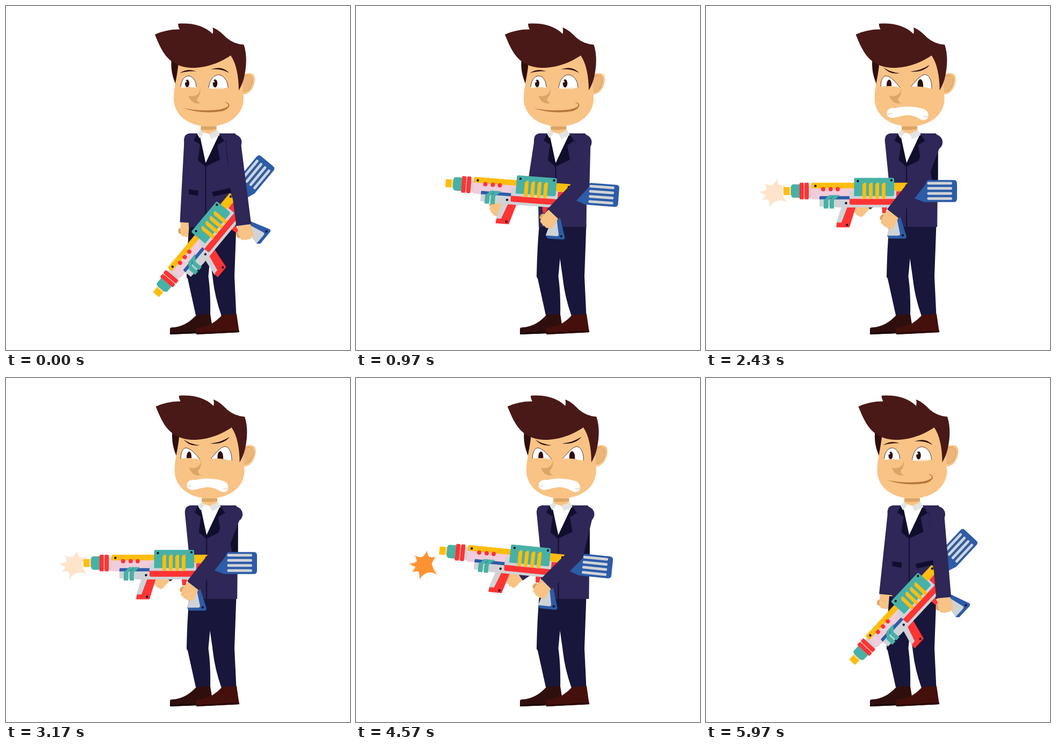
An HTML page for the animation above (6010 ms loop, 640 by 640 pixels).

```html
<!DOCTYPE html>
<html lang="en">
<head>
<meta charset="utf-8">
<title>Toy blaster</title>
<style>
html, body { margin: 0; width: 100%; height: 100%; overflow: hidden; background: #fff; }
svg { display: block; width: 100vw; height: 100vh; }
.skin { fill: #f8c385; }
.shade { fill: #dba566; }
.navy { fill: #2e2757; }
.dark { fill: #100e2d; }
.brown { fill: #2f0f0d; }
.hair { fill: #481917; }
.white { fill: #fff; }
.yellow { fill: #ffbd10; }
.teal { fill: #47b1a6; }
.red { fill: #ff3434; }
.pink { fill: #f1ccdb; }
.gray { fill: #d0d3d6; }
.blue { fill: #2d5ca8; }
.sleeve { fill: none; stroke: #2e2757; stroke-linejoin: round; }
.dots { fill: none; stroke-linecap: round; }
</style>
</head>
<body>
<svg viewBox="0 0 640 640">
  <defs>
    <g id="hand">
      <ellipse class="shade" cx="-12" cy="17" rx="4" ry="6"/>
      <path class="skin" d="M-12-2H12L16 18Q17 25 11 25Q9 29 4 27Q1 30-3 27Q-8 29-10 23L-12 14Z"/>
    </g>
  </defs>

  <g id="farHand"><use href="#hand" transform="scale(.95)"/></g>
  <path id="farArm" class="sleeve" stroke-width="26"/>

  <g id="legs">
    <path fill="#18163a" d="M341 406H428.500L425 503L428.500 576L401 577Q388 540 384.500 505L379.500 470L376.500 503Q381 535 380 575L353 575L338 507L336 504Q337 450 341 406Z"/>
    <path class="brown" d="M354 575L380 573L383 592L380 608L305 611V601Q305 598 309 598Q334 597 354 575Z"/>
    <path fill="#190504" d="M305 608L380 604V608L305 611Z"/>
    <path fill="#45100b" d="M402 575L429 573L434 607L354 611V601Q355 598 358 598Q382 597 402 575Z"/>
    <path fill="#290605" d="M354 608L434 603.500V607L354 611Z"/>
  </g>

  <g id="body">
    <path class="navy" d="M341 237H426Q431 240 430 275L428.500 411H340L338 320L331 249Q332 238 341 237Z"/>
    <path class="dark" d="M408 250L430 258V330H420L411 280Z"/>
    <path class="dark" d="M340 341L358 343.500L357 353L340 350ZM383 346L417 338.500L419 347L386 354.500Z"/>
    <path class="dark" d="M356 237L349 250L361 258L357 287L371 299L398 286L393 259L406 251L397 238Z"/>
    <path class="dark" d="M370.700 296H372.500V411H370.700Z"/>
    <path class="white" d="M361 243L364 234H391L396 240L371.500 292Z"/>
    <path class="skin" d="M362.500 218H391.500V234L377 238L362.500 233Z"/>
    <path class="shade" d="M362.500 224H391.500V229Q377 232 362.500 230Z"/>
    <path fill="#e3e3e1" d="M362 230.500L368.500 236L360 246L355.500 238ZM377 238L393 230.500L398 240L382 248Z"/>

    <path class="skin" d="M440 128C452 122 463 124 463 136C462 153 452 166 440 164Z"/>
    <path fill="#ebb57b" stroke="#dba566" stroke-width="1.300" d="M440 132C452 125 460 130 458.500 142C455 156 447 161 439 159"/>
    <path class="brown" d="M308 98L322 108L317 149C309 131 306 115 308 98Z"/>
    <path class="skin" d="M321 104C319 132 312 150 312 172C312 203 340 224 377 224C414 224 442 203 442 172L438 85Z"/>
    <path class="hair" d="M277 53Q299 43 323 43.500Q320 38 320 33C345 31 368 36 384.500 52Q386 46 384.500 40C395 44 402 51 410 59Q424 71 442.500 72C449 92 447 113 444 128Q441 144 433 157C433 130 428 106 418 92C398 106 370 116 344 115C303 112 291 88 277 53Z"/>
    <path class="shade" d="M361.500 152C361 163 354 170 339 167C344 178 350 183 362 180.500Q354 178 356 172Q363 165 361.500 152Z"/>

    <g id="calm">
      <path class="brown" d="M323 125Q337 115 354 121.500Q338 120.500 323 125ZM381 118Q402 110 415 124.500Q400 116 381 118Z"/>
      <g class="white" stroke="#2f0f0d" stroke-width=".8">
        <path d="M325 151C326 137 333 130 340 130C349 131 354 141 354 151"/>
        <path d="M377 153C379 136 387 128 396 128C407 129 413 142 413 152"/>
      </g>
      <path class="white" d="M325 150Q340 154 354 150.500V152H325ZM377 152Q395 156 413 151Q400 157 377 153Z"/>
      <g class="brown">
        <ellipse cx="337" cy="144" rx="4" ry="7"/>
        <ellipse cx="389" cy="144" rx="4.300" ry="7.500"/>
      </g>
      <path class="dots" stroke="#fff" stroke-width="4" d="M334 140.500h0M386 140.500h0"/>
      <path fill="#b5783a" d="M330 190Q366 197 398 192.500C413 189 420 184 406 178.500C421 180 417 191 403 195.500Q366 202 330 190Z"/>
    </g>

    <g id="angry" transform="translate(-1.500)">
      <path class="brown" d="M330 114Q341 123 360 125Q341 128 330 114ZM380 122Q400 120 416 109.500Q405 124 380 122Z"/>
      <g class="white" stroke="#2f0f0d" stroke-width=".8">
        <path d="M325 150C325 138 329 130 335 130C343 131 352 140 361 152"/>
        <path d="M381 150C390 140 398 129 407 127.500C416 128 420 140 420 154"/>
      </g>
      <path class="brown" d="M336 149C335 134 346 132 345 149ZM393.500 150C392 132 405 131 404 151Z"/>
      <path class="skin" d="M324 150.500Q342 147 362 152V155H324ZM380 150Q402 148.500 421 154.500V157H380Z"/>
      <path class="white" d="M336 200C337 192 343 188 352 190C372 184 396 188 408 193C415 198 416 210 407 212C398 214 395 204 375 203C358 204 350 211 341 207Q336 205 336 200Z"/>
      <path fill="none" stroke="#b99" stroke-width=".7" d="M336 200Q340 203 345 200M404 205Q409 208 413 205"/>
    </g>
  </g>

  <path id="flash" fill="#ff9333" d="M98 345Q108 346 113 341Q113 336 109 330Q117 334 123 333Q129 329 132 321Q133 330 137 333Q143 335 149 332Q143 339 141 346Q145 360 152 366Q142 361 135 362Q124 364 118 375Q119 364 116 360Q110 359 104 361Q110 355 110 351Q104 349 98 345Z"/>

  <g id="gun">
    <path class="blue" d="M376 344L408 330Q410 324 415 324H461Q467 324 467 330V359Q467 365 461 365H406L376 354Z"/>
    <path class="dots" stroke="#d0d3d6" stroke-width="5" d="M414 330H455.500M414 339.500H455.500M414 349H455.500M414 358.500H455.500"/>
    <path class="blue" d="M350 380L361 391L373 429Q373 433 369 433H341L337 428Z"/>
    <path class="gray" d="M347 384L355 395L361 424Q361 427 358 427.500H337L344 404Z"/>
    <path class="red" d="M327 373H338L334 386H328Z"/>
    <path class="gray" d="M252 374H268L256 405H242Z"/>
    <path class="red" d="M263 374H278.500L267 412H243Q241 411 244 403H252Z"/>
    <rect class="yellow" x="144" y="337" width="13" height="15" rx="2"/>
    <rect fill="#f7d98b" x="155" y="337" width="5" height="15"/>
    <rect class="gray" x="170" y="334" width="26" height="22"/>
    <path class="teal" d="M162 332H174V357H162Q158 355 158 350V338Q158 333 162 332Z"/>
    <path class="pink" d="M191 338H300V360H198L191 355Z"/>
    <path class="gray" d="M190 337H196V357H190Z"/>
    <g class="red">
      <rect x="174" y="329" width="8" height="31" rx="2"/>
      <rect x="183.300" y="329" width="8" height="31" rx="2"/>
    </g>
    <path class="yellow" d="M198 329H376Q379 330 376 334L368 347H350L346 339.500H196V331Z"/>
    <path class="dots" stroke="#ff3434" stroke-width="8" d="M218 341h0M232 341h0M245 341h0"/>
    <rect class="blue" x="211" y="354" width="75" height="10" rx="2"/>
    <path class="gray" d="M211 360H352V375H245L211 373Z"/>
    <path class="gray" d="M269 344H358V360H267V347Z"/>
    <path class="red" d="M267 359H354V345H369L376 352V370H270Q267 370 267 367Z"/>
    <path class="teal" d="M219 377V362L229 352H239L227.500 362V377ZM230 377V362L239 352H249L238 362V377Z"/>
    <path class="teal" d="M278 320H347Q350 320 350 323V350Q350 354 346 354H275.500V323Q275.500 320 278 320Z"/>
    <path class="gray" d="M288 354H335V359H288Z"/>
    <path class="yellow" d="M291 360V333L294 329H298V358ZM303 360V333L306 329H310V358ZM315 360V333L318 329H322V358ZM327 360V333L330 329H334V358Z"/>
    <path class="dots" stroke="#10142f" stroke-width="4.400" d="M203.500 335h0M373 334.500h0M282.500 326h0M345 324.500h0M260.500 367h0M262.500 407.500h0M366 427h0"/>
  </g>

  <g id="nearHand"><use href="#hand"/></g>
  <path id="nearArm" class="sleeve" stroke-width="28"/>
  <circle id="shoulder" class="navy" cy="253.500" r="14.500"/>
</svg>
<script>
const LOOP = 6010, STEP = 40, LAST = 149;
const FIRE = 60, LAST_SHOT = 108, CALM = 117;
const PIVOT = [340, 392];

// step, grip x, grip y, gun angle, far wrist x, far wrist y
const keys = [
  [0, 441, 416.8, -50.2, 336.5, 403],
  [16, 398.7, 424, -31.7, 318, 398],
  [24, 358.5, 391.5, 4.3, 273, 368],
  [32, 332, 388, 21, 280, 362],
  [45, 336.5, 392, -1.2, 296, 368],
  [108, 336.5, 392, -1.2, 296, 368],
  [114, 335, 388.5, 2.1, 298, 366],
  [124, 366.6, 421, -30.3, 305, 392],
  [140, 405.4, 415, -46.8, 322, 402],
  [149, 426.3, 419.3, -51.8, 328.5, 403]
];

const $ = id => document.getElementById(id);
const ease = x => (1 - Math.cos(Math.PI * x)) / 2;

const slope = (i, c) => (keys[i + 1][c] - keys[i][c]) / (keys[i + 1][0] - keys[i][0]);

// Tangent that never overshoots a key
function tangent(i, c) {
  if (i === 0 || i === keys.length - 1) return 0;
  const a = slope(i - 1, c), b = slope(i, c);
  return a * b > 0 ? 2 * a * b / (a + b) : 0;
}

function track(step, c) {
  let i = 0;
  while (i < keys.length - 2 && step >= keys[i + 1][0]) i++;
  const a = keys[i], b = keys[i + 1], span = b[0] - a[0], u = (step - a[0]) / span;
  const blend = u * u * (3 - 2 * u);
  return a[c] + (b[c] - a[c]) * blend
    + span * u * (1 - u) * (tangent(i, c) * (1 - u) - tangent(i + 1, c) * u);
}

// Two equal bones; the elbow points backwards
function poseArm(arm, hand, sx, sy, wx, wy, bone) {
  const dx = wx - sx, dy = wy - sy, d = Math.hypot(dx, dy);
  const bend = Math.sqrt(Math.max(0, bone * bone - d * d / 4));
  const ex = (sx + wx) / 2 + dy / d * bend, ey = (sy + wy) / 2 - dx / d * bend;
  arm.setAttribute('d', `M${sx} ${sy}L${ex} ${ey}L${wx} ${wy}`);
  const turn = Math.atan2(wy - ey, wx - ex) * 180 / Math.PI - 90;
  hand.setAttribute('transform', `translate(${wx} ${wy}) rotate(${turn})`);
}

function draw(step) {
  const firing = step > FIRE && step < CALM;
  const shot = step < LAST_SHOT ? (step - FIRE) % 6 : step - LAST_SHOT;
  let recoil = 0;
  if (step > FIRE) recoil = step < LAST_SHOT ? ease(shot / 3) : ease(Math.min(1, shot / 9));
  const lean = 6.5 * recoil;

  const x = track(step, 1) + 14 * recoil, y = track(step, 2) - 1.3 * recoil;
  const angle = track(step, 3) + 4.8 * recoil;
  const c = Math.cos(angle * Math.PI / 180), s = Math.sin(angle * Math.PI / 180);

  $('body').setAttribute('transform', `translate(${lean})`);
  $('calm').style.display = firing ? 'none' : '';
  $('angry').style.display = firing ? '' : 'none';
  $('flash').style.opacity = firing ? (shot < 3 ? ease(shot / 3) : 1) : 0;
  $('gun').setAttribute('transform',
    `translate(${x} ${y}) rotate(${angle}) translate(${-PIVOT[0]} ${-PIVOT[1]})`);
  $('shoulder').setAttribute('cx', 424 + lean);

  poseArm($('nearArm'), $('nearHand'), 422.5 + lean, 252, x + 8 * c + 5 * s, y + 8 * s - 5 * c, 78.2);
  poseArm($('farArm'), $('farHand'), 344.5 + lean, 252, track(step, 4) + lean, track(step, 5), 74);
}

function tick() {
  const time = performance.now() % LOOP;
  draw(Math.min(LAST, Math.max(0, Math.ceil(time / STEP - 0.5))));
  requestAnimationFrame(tick);
}
tick();
</script>
</body>
</html>
```
